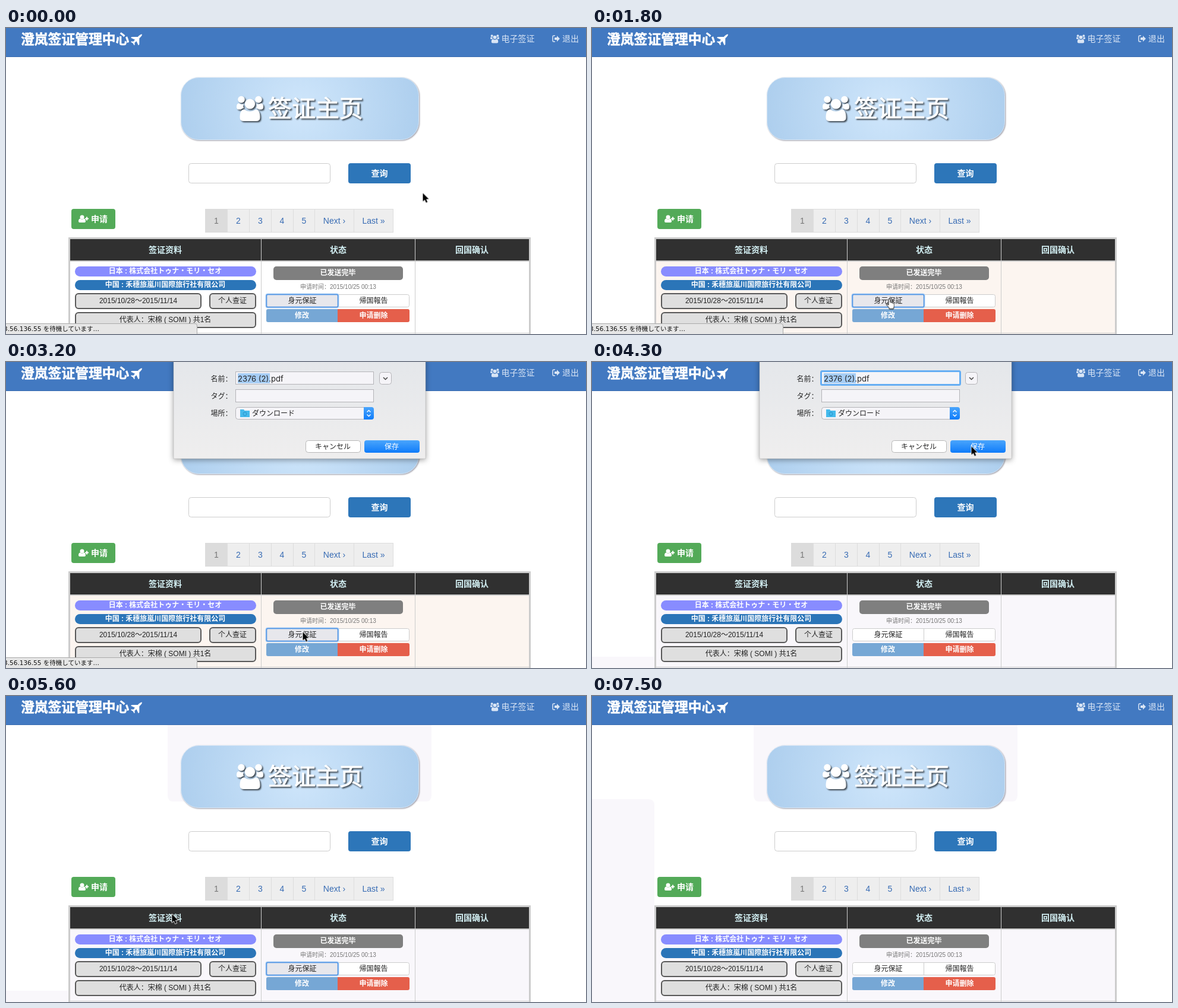
Animation, 976 px wide and 516 px high, one loop 7.6 s. Source, as an HTML page:

```html
<!DOCTYPE html>
<html lang="zh">
<head>
<meta charset="utf-8">
<title>签证主页</title>
<style>
html, body { margin: 0; width: 100%; height: 100%; overflow: hidden; background: #fff; }
svg { display: block; }
text {
  font: 12px "Liberation Sans", "Noto Sans CJK SC", "Noto Sans CJK JP", "Noto Sans CJK", sans-serif;
  fill: #222;
}
.ja, .ja text { font-family: "Liberation Sans", "Noto Sans CJK JP", "Noto Sans CJK", sans-serif; }
.mid { text-anchor: middle; }
.bold { font-weight: bold; }
.light { fill: #fff; }
.s14 { font-size: 14px; }
.brand { font-size: 22.8px; stroke: #fff; stroke-width: .5; }
.title { font-size: 40px; stroke: #fff; stroke-width: .8; }
.head text { font-size: 14px; font-weight: bold; fill: #d5f2f6; text-anchor: middle; }
.pages text { font-size: 14px; fill: #386cb4; text-anchor: middle; }
.box { fill: #dfdfdf; stroke: #585858; stroke-width: 2; }
.plain { fill: #fff; stroke: #ccc; }
.mac { fill: #f5f4f8; stroke: #b4b4b8; }
.ja .file { font: 13px Inter, "Liberation Sans", sans-serif; }
.wait { font: 10.5px "DejaVu Sans", "Noto Sans CJK JP", "Noto Sans CJK", sans-serif; fill: #111; }
.raised { filter: drop-shadow(2px 2px .8px rgba(30, 35, 40, .8)); }
.banner { filter: drop-shadow(1.5px 1.5px 1px rgba(80, 80, 100, .6)); }
.sheet { filter: drop-shadow(0 2px 5px rgba(0, 0, 0, .38)); }
.tint { fill: #f9f7fb; }

/* One loop is 76 ticks of 100 ms. */
.row, .focus, .wait-bar, .bar-tint, .sheet-tint, .side-tint, .ring, .dialog, .cursor, .arrow, .hand {
  animation: 7.6s step-end infinite;
}
.row { animation-name: row; }
.focus { animation-name: focus; }
.wait-bar { animation-name: wait; }
.bar-tint { animation-name: bar-tint; }
.sheet-tint { animation-name: sheet-tint; }
.side-tint { animation-name: side-tint; }
.ring { animation-name: ring; }
.dialog { animation-name: dialog; }
.cursor { animation-name: cursor; }
.arrow { animation-name: arrow; }
.hand { animation-name: hand; }

@keyframes row {
  0% { fill: #fff; }
  13.15% { fill: #fcf5f0; }
  44.73%, 100% { fill: #f9f7fb; }
}
@keyframes focus {
  0% { opacity: 1; }
  43.42% { opacity: 0; }
  73.68% { opacity: 1; }
  92.1%, 100% { opacity: 0; }
}
@keyframes wait { 0% { opacity: 1; } 46.05%, 100% { opacity: 0; } }
@keyframes bar-tint { 0% { opacity: 0; } 46.05%, 100% { opacity: 1; } }
@keyframes sheet-tint { 0% { opacity: 0; } 61.84%, 100% { opacity: 1; } }
@keyframes side-tint { 0% { opacity: 0; } 78.94%, 100% { opacity: 1; } }
@keyframes ring { 0% { opacity: 0; } 43.42%, 100% { opacity: 1; } }
@keyframes dialog {
  0% { transform: translateY(-185px); }
  35.52% { transform: translateY(-185px); animation-timing-function: steps(3); }
  39.47% { transform: none; }
  60.52% { transform: none; animation-timing-function: steps(3); }
  64.47%, 100% { transform: translateY(-185px); }
}
@keyframes cursor {
  0% { transform: translate(701.5px, 278.5px); }
  2.63% { transform: translate(701.5px, 278.5px); animation-timing-function: steps(2); }
  5.26% { transform: translate(670px, 278.5px); animation-timing-function: steps(3); }
  9.21% { transform: translate(600px, 300px); animation-timing-function: steps(5); }
  15.78% { transform: translate(499.5px, 455.5px); }
  43.42% { transform: translate(499.5px, 455.5px); animation-timing-function: steps(3); }
  46.05% { transform: translate(519px, 237px); animation-timing-function: steps(1); }
  47.36% { transform: translate(542px, 186px); animation-timing-function: steps(4); }
  52.63% { transform: translate(638.5px, 142.5px); }
  59.21% { transform: translate(638.5px, 145px); }
  68.42% { transform: translate(638.5px, 145px); animation-timing-function: steps(7); }
  77.63%, 100% { transform: translate(10px, 535px); }
}
@keyframes arrow { 0% { opacity: 1; } 15.78% { opacity: 0; } 35.52%, 100% { opacity: 1; } }
@keyframes hand { 0% { opacity: 0; } 15.78% { opacity: 1; } 35.52%, 100% { opacity: 0; } }
</style>
</head>
<body>
<svg width="976" height="516" viewBox="0 0 976 516">
  <defs>
    <radialGradient id="sky" gradientUnits="userSpaceOnUse" cx="495" cy="136" r="200">
      <stop offset="0" stop-color="#cfe6fb"/>
      <stop offset="1" stop-color="#aecfee"/>
    </radialGradient>
    <linearGradient id="panel" x1="0" y1="0" x2="0" y2="1">
      <stop offset="0" stop-color="#e3e6ea"/>
      <stop offset="1" stop-color="#efeeee"/>
    </linearGradient>
    <linearGradient id="blue" x1="0" y1="0" x2="0" y2="1">
      <stop offset="0" stop-color="#4aa5fc"/>
      <stop offset="1" stop-color="#0f7cfa"/>
    </linearGradient>
    <g id="users">
      <circle cx="8" cy="6.500" r="5.800"/>
      <circle cx="37" cy="6.500" r="5.800"/>
      <path d="M0 19Q0 13 4 13Q8 16 11.500 14Q10.500 18 12 21Q9 21.500 7 23.500H4Q0 23.500 0 19ZM45 19Q45 13 41 13Q37 16 33.500 14Q34.500 18 33 21Q36 21.500 38 23.500H41Q45 23.500 45 19Z"/>
      <circle cx="22.500" cy="14" r="8.600"/>
      <path d="M5.500 37Q5.500 23.500 13 23.500Q22.500 30 32 23.500Q39.500 23.500 39.500 37Q39.500 43 33 43H12Q5.500 43 5.500 37Z"/>
    </g>
  </defs>

  <!-- header -->
  <rect width="976" height="49" fill="#4279c1"/>
  <rect y="48" width="976" height="1" fill="#396cb1"/>
  <text x="25" y="26.500" class="bold light brand">澄岚签证管理中心</text>
  <path transform="translate(220.500 18.800) rotate(45) scale(.9)" fill="#fff"
    d="M0-13Q2-12 2-7V-4L10 4V6.500L2 3.500L1.600 8L4.500 10.500V12L0 10.800L-4.500 12V10.500L-1.600 8L-2 3.500L-10 6.500V4L-2-4V-7Q-2-12 0-13Z"/>
  <g fill="#d9e5f5">
    <use href="#users" transform="translate(815 11) scale(.335)"/>
    <text x="833.500" y="23" class="s14" style="fill:inherit">电子签证</text>
    <path d="M924 13H921.500Q920 13 920 14.500V21.500Q920 23 921.500 23H924" fill="none" stroke="#d9e5f5" stroke-width="1.500"/>
    <path d="M923 16H927V13L932 18L927 23V20H923Z"/>
    <text x="936" y="23" class="s14" style="fill:inherit">退出</text>
  </g>

  <!-- faint patches left on the page -->
  <path class="tint sheet-tint" d="M272 49H716V168Q716 178 706 178H282Q272 178 272 168Z"/>
  <path class="tint side-tint" d="M0 174H95Q105 174 105 184V516H0Z"/>
  <rect class="tint bar-tint" y="497" width="105" height="19"/>

  <!-- banner and search -->
  <rect class="banner" x="294.500" y="83.500" width="400" height="105" rx="30" fill="url(#sky)" stroke="#d8e7f6"/>
  <g class="raised" fill="#fff">
    <use href="#users" x="388" y="114"/>
    <text x="441" y="150" class="light title">签证主页</text>
  </g>
  <rect class="plain" x="307.500" y="228.500" width="238" height="33" rx="4"/>
  <rect x="576" y="228" width="105" height="34" rx="4" fill="#2d76b9"/>
  <text x="628.500" y="250" class="mid bold light s14">查询</text>

  <!-- apply button -->
  <rect x="110" y="305" width="74" height="34" rx="4" fill="#53aa58"/>
  <g fill="#fff">
    <circle cx="128" cy="319" r="3.500"/>
    <path d="M122 326Q122 321.500 125 321.500Q128 324 131 321.500Q134 321.500 134 326Q134 328 132 328H124Q122 328 122 326ZM133 320.500H135V318.500H137V320.500H139V322.500H137V324.500H135V322.500H133Z"/>
  </g>
  <text x="143" y="327" class="bold light s14">申请</text>

  <!-- pagination -->
  <g class="pages">
    <rect x="335.500" y="305.500" width="316" height="39" fill="#eee" stroke="#ddd"/>
    <rect x="335" y="305" width="38" height="40" fill="#dcdcdc"/>
    <path d="M372.500 305V345M409.500 305V345M446.500 305V345M483.500 305V345M519.500 305V345M585.500 305V345" stroke="#ddd"/>
    <text x="354" y="330" style="fill:#777">1</text>
    <text x="391" y="330">2</text>
    <text x="428" y="330">3</text>
    <text x="464.500" y="330">4</text>
    <text x="501.500" y="330">5</text>
    <text x="552.500" y="330">Next ›</text>
    <text x="618.500" y="330">Last »</text>
  </g>

  <!-- table -->
  <rect class="row" x="106" y="354" width="776" height="162"/>
  <path d="M106.500 516V354.500H881.500V516" fill="none" stroke="#ccc" stroke-width="3"/>
  <rect x="108" y="356" width="772" height="36" fill="#303030"/>
  <path d="M108 393H880" stroke="#ccc" stroke-width="2"/>
  <path d="M429.500 356V516M688.500 356V516M108 514.500H880" stroke="#ccc"/>
  <g class="head">
    <text x="268" y="379">签证资料</text>
    <text x="559" y="379">状态</text>
    <text x="784" y="379">回国确认</text>
  </g>

  <!-- visa details -->
  <rect x="116" y="402" width="305" height="17" rx="8.500" fill="#888cff"/>
  <text x="268" y="414" class="mid bold light ja">日本 : 株式会社トゥナ・モリ・セオ</text>
  <rect x="116" y="425" width="305" height="17" rx="8.500" fill="#2b75b8"/>
  <text x="268" y="437" class="mid bold light ja">中国 : 禾穗旅嵐川国際旅行社有限公司</text>
  <rect class="box" x="117" y="448" width="211" height="25" rx="5"/>
  <text x="222.500" y="464" class="mid ja">2015/10/28～2015/11/14</text>
  <rect class="box" x="343" y="448" width="77" height="25" rx="5"/>
  <text x="381" y="464" class="mid">个人查证</text>
  <rect class="box" x="117" y="480" width="303" height="25" rx="5"/>
  <text x="268" y="496" class="mid ja">代表人：宋棉 ( SOMI ) 共1名</text>

  <!-- status -->
  <rect x="450" y="402" width="218" height="23" rx="5" fill="#7f7f7f"/>
  <text x="558.500" y="417" class="mid bold light">已发送完毕</text>
  <text x="559" y="440" class="mid ja" style="font-size:10px;fill:#777">申请时间：2015/10/25 00:13</text>
  <rect class="plain" x="438.500" y="449.500" width="240" height="21" rx="3"/>
  <path d="M558.500 449V471" stroke="#ccc"/>
  <g class="focus">
    <rect x="437.500" y="448.500" width="122" height="23" rx="3" fill="none" stroke="#a9cdf4" stroke-width="2"/>
    <rect x="438.500" y="449.500" width="120" height="21" rx="2" fill="#e7e7ec" stroke="#4a90e2" stroke-width="1.500"/>
  </g>
  <text x="498.500" y="464" class="mid ja">身元保証</text>
  <text x="618.500" y="464" class="mid ja">帰国報告</text>
  <path d="M558 474H441Q438 474 438 477V493Q438 496 441 496H558Z" fill="#76a7d5"/>
  <path d="M558 474H676Q679 474 679 477V493Q679 496 676 496H558Z" fill="#e55f4b"/>
  <text x="498" y="489" class="mid bold light">修改</text>
  <text x="618.500" y="489" class="mid bold light">申请删除</text>

  <!-- browser status bar -->
  <g class="wait-bar">
    <path d="M-1 498.500H318Q321.500 498.500 321.500 502V517H-1Z" fill="#e6e6e6" stroke="#aaa"/>
    <text x="-4" y="511" class="wait">3.56.136.55 を待機しています…</text>
  </g>

  <!-- save sheet -->
  <g class="dialog ja">
    <rect class="sheet" x="282" y="-20" width="424" height="183" fill="url(#panel)" stroke="#b0b0b0" stroke-width=".5"/>
    <text x="344.500" y="32.500">名前：</text>
    <text x="344.500" y="61.500">タグ：</text>
    <text x="344.500" y="90.500">場所：</text>
    <rect class="mac" x="386.500" y="16.500" width="232" height="21"/>
    <rect class="ring" x="385.500" y="15.500" width="234" height="23" rx="2" fill="none" stroke="#66aef3" stroke-width="3"/>
    <rect x="390" y="19" width="54" height="17" fill="#a6cdf5"/>
    <text x="390" y="32.500" class="file">2376 (2).pdf</text>
    <rect class="mac" x="628.500" y="17.500" width="20" height="20" rx="4"/>
    <path d="M635 26L638.500 29.500L642 26" fill="none" stroke="#444" stroke-width="1.500"/>
    <rect class="mac" x="386.500" y="46.500" width="232" height="21"/>
    <rect class="mac" x="386.500" y="76.500" width="232" height="20" rx="4"/>
    <path d="M602 76H615Q619 76 619 80V93Q619 97 615 97H602Z" fill="url(#blue)"/>
    <path d="M607.500 84.500L610.500 81.500L613.500 84.500M607.500 88.500L610.500 91.500L613.500 88.500" fill="none" stroke="#fff" stroke-width="1.400"/>
    <path d="M394 80H400L401.500 82H410V93H394Z" fill="#45baec"/>
    <circle cx="402" cy="87.500" r="3" fill="none" stroke="#2592ca"/>
    <text x="414" y="90.500">ダウンロード</text>
    <rect class="plain" x="504.500" y="132.500" width="92" height="20" rx="4" style="stroke:#b8b8b8"/>
    <text x="550" y="147" class="mid">キャンセル</text>
    <rect x="603" y="132" width="93" height="21" rx="4" fill="url(#blue)"/>
    <text x="649" y="147" class="mid light">保存</text>
  </g>

  <!-- pointer -->
  <g class="cursor" stroke-linejoin="round">
    <path class="arrow" d="M0 0V14L3.200 11L5.400 16L7.800 15L5.600 10H10Z" stroke="#fff" stroke-width="1.600" paint-order="stroke"/>
    <path class="hand" transform="translate(1 1)" fill="#fff" stroke="#000"
      d="M-1.500 1.500A1.500 1.500 0 0 1 1.500 1.500V6Q3.500 5 4 6.800Q6 6.200 6.300 7.800Q8.300 7.500 8.300 9.300V12Q8.300 14 7 15.500V17H-.5V15.500Q-3 12.500-5 10Q-5 8.200-3 9L-1.500 10.600Z"/>
  </g>
</svg>
</body>
</html>
```
